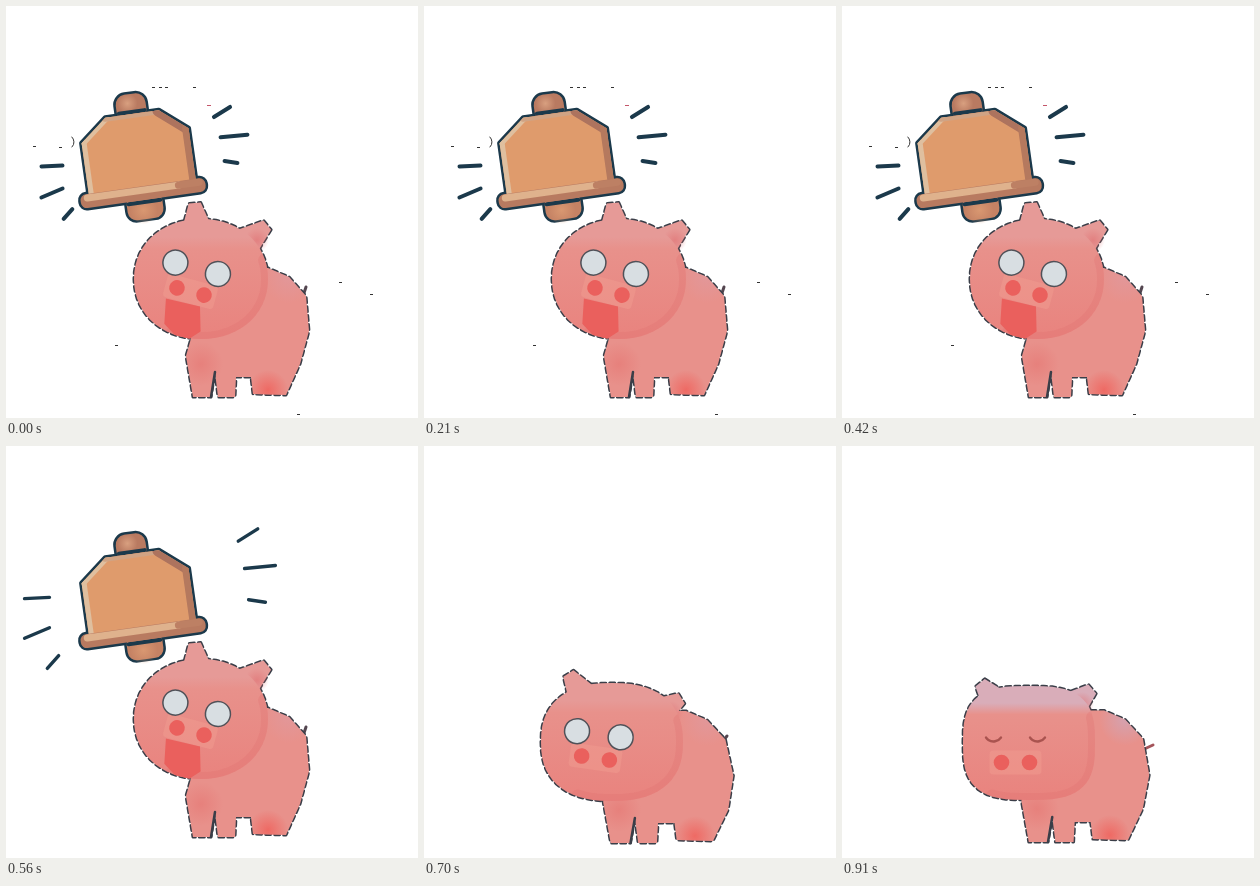
An HTML page with a canvas that plays this animation: 412x412 px, repeating every 980 ms.

```html
<!DOCTYPE html>
<html lang="en">
<head>
<meta charset="utf-8">
<title>Pig and bell</title>
<style>
html, body { margin: 0; width: 100%; height: 100%; overflow: hidden; background: #fff; }
canvas { display: block; width: 412px; height: 412px; }
</style>
</head>
<body>
<canvas id="stage" width="412" height="412"></canvas>
<script>
const c = document.getElementById('stage').getContext('2d');
const STEP = 70, COUNT = 14;
const INK = '#1b394b', SKIN = '#e8918b', RED = '#ea605d';

// head: centre, radii, squareness; nose: position and face angle; legs: stride and drop.
const shout = { head: [195, 273, 67, 60, 2.1], nose: [184.5, 285.5, .26], ears: [189, 200, 259, 221], legs: [0, 0], tail: [300, 281], open: 1 };
const droop = { head: [188, 296, 71, 59, 2.4], nose: [171.5, 312, .14], ears: [146, 230, 255, 254], legs: [9, 6], tail: [303, 290], open: 0 };
const crouch = { head: [184, 320, 65, 59, 3], nose: [171.5, 341.5, -.18], ears: [114, 290, 234, 272], legs: [12, 10], tail: [312, 310], open: 0 };
const rest = { head: [187, 297, 66, 57, 3], nose: [173.5, 316.5, 0], ears: [140, 239, 248, 245], legs: [6, 5], tail: [311, 299], open: 0 };
const tints = { wide: '#e69a97', dark: '#e59c9c', closed: '#d9adb9' };

const lerp = (a, b, t) => Array.isArray(a) ? a.map((v, i) => lerp(v, b[i], t)) : a + (b - a) * t;
const between = (a, b) => Object.fromEntries(Object.keys(a).map(k => [k, lerp(a[k], b[k], .5)]));
const descent = [between(shout, droop), droop, between(droop, crouch), crouch, rest];

const points = text => text.split(' ').map(p => p.split(',').map(Number));
const torso = points('200,280 230,262 262,262 283,271 300,290 303,325 294,358 280,389 247,388 245,371 230,371 229,391 212,391 209,366 205,391 187,391 180,350');

function polygon(pts, closed = true) {
  const path = new Path2D();
  pts.forEach(p => path.lineTo(...p));
  if (closed) path.closePath();
  return path;
}

function box(x, y, w, h, r) {
  const path = new Path2D();
  path.roundRect(x, y, w, h, r);
  return path;
}

function paint(path, fill) {
  c.fillStyle = fill;
  c.fill(path);
}

function trace(path, color, width) {
  c.strokeStyle = color;
  c.lineWidth = width;
  c.stroke(path);
}

const line = (a, b, color, width) => trace(polygon([a, b], false), color, width);

function disc(x, y, r) {
  const path = new Path2D();
  path.arc(x, y, r, 0, 7);
  return path;
}

function headPath([x, y, rx, ry, power], from = 0, to = 2 * Math.PI) {
  const bend = v => Math.sign(v) * Math.abs(v) ** (2 / power);
  const pts = Array.from({ length: 61 }, (_, i) => {
    const a = lerp(from, to, i / 60);
    return [x + rx * bend(Math.cos(a)), y + ry * bend(Math.sin(a))];
  });
  return polygon(pts, to - from > 6);
}

// A blunt wedge pointing away from the middle of the head.
function earPath(x, y, [hx, hy]) {
  const a = Math.atan2(hy - y, hx - x), cos = Math.cos(a), sin = Math.sin(a);
  return polygon([[-3, -6], [34, -19], [34, 19], [-3, 6]].map(([u, v]) => [x + u * cos - v * sin, y + u * sin + v * cos]));
}

function torsoPoints([stride, drop]) {
  return torso.map(([x, y]) => {
    const low = Math.min(1, Math.max(0, (y - 280) / 80));
    return [x + stride * low * (x - 190) / 90, y + drop * (.5 + low / 2)];
  });
}

function glow(x, y, r, color) {
  const g = c.createRadialGradient(x, y, 0, x, y, r);
  g.addColorStop(0, color);
  g.addColorStop(1, color.slice(0, 7) + '00');
  c.fillStyle = g;
  c.fillRect(x - r, y - r, 2 * r, 2 * r);
}

function drawEye(x, y, mood) {
  if (mood === 'wide') {
    paint(disc(x, y, 12.5), '#d8dee2');
    trace(disc(x, y, 12.5), '#505158', 1.5);
  } else if (mood === 'dark') {
    paint(box(x - 7, y - 9, 15, 18, 4), '#a8444b');
    paint(disc(x + 5, y - 6, 3), '#d57b78');
  } else {
    const lid = new Path2D();
    lid.arc(x, y - 6, 9, .6, Math.PI - .6);
    trace(lid, '#a9534f', 2.5);
  }
}

function drawFace([x, y, angle], open, mood) {
  c.save();
  c.translate(x, y);
  c.rotate(angle);
  paint(box(-26, -12, 52, 24, 4), '#f09d9177');
  if (open) paint(polygon([[-22, 13], [13, 12], [20, 36], [11, 46], [-4, 46], [-17, 38]].map(([u, v]) => [u, 13 + (v - 13) * open])), RED);
  for (const side of [-1, 1]) {
    paint(disc(side * 14, 0, 7.8), RED);
    drawEye(side * 22, -24, mood);
  }
  c.restore();
}

function drawPig({ head, nose, ears, legs, tail, open }, mood) {
  const body = torsoPoints(legs), skull = headPath(head), [hx, hy, , ry] = head;
  const earPaths = [earPath(ears[0], ears[1], head), earPath(ears[2], ears[3], head)];
  const trunk = polygon(body);

  line([298, tail[1] + 6], tail, mood === 'wide' ? '#544650' : '#a4545a', 3);
  c.setLineDash([5, 4]);
  for (const path of [trunk, ...earPaths, skull]) trace(path, '#3a3e48', 3);
  c.setLineDash([]);

  paint(trunk, SKIN);
  c.save();
  c.clip(trunk);
  glow(262 + legs[0], 384 + legs[1], 20, '#f0605acc');
  glow(...body[3], 26, mood === 'wide' ? '#df9aa0aa' : '#d0a6b8cc');
  glow(195, 358 + legs[1], 22, '#e56e6b77');
  c.restore();
  line(body[13], body[14], '#3a3e48', 2.5);

  earPaths.forEach(path => paint(path, tints[mood]));
  glow(ears[2] - 8, ears[3] + 13, 12, '#e0707299');
  const shade = c.createLinearGradient(0, hy - ry, 0, hy + ry);
  [[0, tints[mood]], [.15, tints[mood]], [.25, SKIN], [1, '#e9837e']].forEach(stop => shade.addColorStop(...stop));
  paint(skull, shade);
  c.save();
  c.clip(skull);
  trace(headPath(head, -.3, 2), '#dc6f6d44', 14);
  c.restore();
  drawFace(nose, open, mood);
}

function drawBell() {
  const right = [[27, -43], [54, -21], [54, 36]];
  const dome = polygon([...right, ...right.map(([x, y]) => [-x, y]).reverse()]);
  const rim = box(-63, 30, 126, 14, 6);
  const knob = box(-15, -63, 30, 27, 10), clapper = box(-18, 38, 36, 25, 9);
  c.save();
  c.translate(132, 150.5);
  c.rotate(-.14);
  for (const path of [knob, clapper, dome, rim]) trace(path, INK, 5);
  paint(knob, '#b97a61');
  glow(-3, -54, 10, '#dda584dd');
  paint(clapper, '#c58264');
  glow(-2, 54, 14, '#dc9b73dd');
  line([-13, -45], [13, -45], INK, 4);
  line([-16, 46], [16, 46], INK, 4);

  paint(dome, '#df9b6c');
  c.save();
  c.clip(dome);
  line([-54, 36], [-54, -21], '#dfbf9f', 10);
  line([-54, -21], [-27, -43], '#dfbf9f', 8);
  line([-27, -43], [25, -43], '#d0a384', 8);
  line([27, -43], [54, -21], '#ad735e', 13);
  line([54, -21], [54, 36], '#b5795e', 13);
  c.restore();

  paint(rim, '#b87a60');
  line([-56, 34], [36, 34], '#dfb28d', 7);
  line([36, 34], [57, 34], '#bd8064', 7);
  c.restore();
}

// Middle, angle and length of each stroke; three on either side.
const rays = [[216, 106, -.56, 19], [228, 130, -.1, 27], [225, 156, .15, 13], [46, 160, -.05, 21], [46, 187, -.4, 23], [62, 208, -.84, 13]];

function drawRays(spread) {
  rays.forEach(([x, y, angle, length], i) => {
    const right = i < 3;
    const mx = x + spread * (right ? 26 : -15);
    const my = y + spread * ((i % 3 - 1) * 8 - (right ? 9 : 0));
    const half = length / 2 + spread * 2, dx = half * Math.cos(angle), dy = half * Math.sin(angle);
    line([mx - dx, my - dy], [mx + dx, my + dy], INK, 4 - spread * .6);
  });
}

function fleck(x, y, w = 3, color = '#333') {
  c.fillStyle = color;
  c.fillRect(x, y, w, 1);
}

function drawFlecks() {
  points('146,81 153,81 159,81 187,81 27,140 53,141 333,276 364,288 109,339 291,408').forEach(p => fleck(...p));
  fleck(201, 99, 4, '#c4566a');
  const curl = new Path2D();
  curl.arc(61, 136, 7, -.8, .8);
  trace(curl, '#333', 1);
}

function draw(step) {
  c.clearRect(0, 0, 412, 412);
  if (step < 9) {
    const beat = step % 3;
    if (beat === 0) drawFlecks();
    drawRays(beat / 2);
    drawBell();
    drawPig(shout, 'wide');
  } else {
    drawPig(descent[step - 9], step < 12 ? 'wide' : step === 12 ? 'dark' : 'closed');
  }
}

c.lineCap = c.lineJoin = 'round';
const start = performance.now();
function tick() {
  draw(Math.floor((performance.now() - start) / STEP) % COUNT);
  requestAnimationFrame(tick);
}
tick();
</script>
</body>
</html>
```
